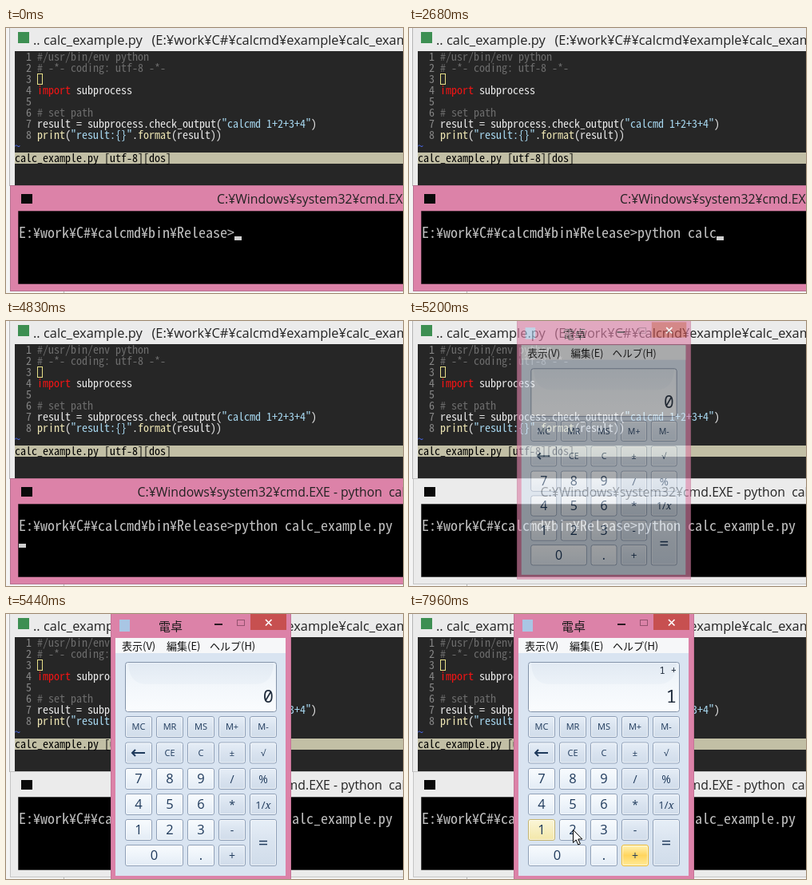
Recreate the animation shown at these times as an HTML page. Size 497 px wide and 332 px high, loop 8000 ms.

```html
<!DOCTYPE html>
<html lang="ja">
<head>
<meta charset="utf-8">
<style>
html, body { margin: 0; width: 100%; height: 100%; overflow: hidden; }
svg { display: block; width: 497px; height: 332px; }
text { white-space: pre; }
.ui { font-family: "Open Sans", "Noto Sans", sans-serif; }
.jp { font-family: "Noto Sans CJK JP", "Noto Sans CJK", sans-serif; }
.mono { font-family: "Noto Sans Mono CJK JP", "Noto Sans CJK JP", "Liberation Mono", monospace; }
.lcd { font-family: "Noto Sans Mono", "DejaVu Sans Mono", monospace; text-anchor: end; fill: #1e2a3a; }
.key text { text-anchor: middle; fill: #1e395b; }
</style>
</head>
<body>
<svg id="stage" viewBox="0 0 497 332">
  <defs id="defs"></defs>
  <g id="desk"></g>
  <g id="calc"></g>
</svg>
<script>
const LOOP = 8000;
const PINK = '#dc82a8', GREY = '#ebebeb', INK = '#c0c0c0';
const CODE = '#e8e8e8', NOTE = '#6c6c6c', STRING = '#a6d6ee', CALL = '#eee6b4';
const $ = id => document.getElementById(id);
const esc = s => s.replace(/&/g, '&amp;').replace(/</g, '&lt;');

const rect = (x, y, w, h, fill, more = '') =>
  `<rect x="${x}" y="${y}" width="${w}" height="${h}" fill="${fill}" ${more}/>`;
const text = (cls, x, y, size, s, fill = '#222', more = '') =>
  `<text class="${cls}" x="${x}" y="${y}" font-size="${size}" fill="${fill}" ${more}>${esc(s)}</text>`;
// One x per character keeps the text on the terminal grid.
const cells = (s, x, y, w, fill, more) =>
  text('mono', [...s].map((_, i) => x + i * w).join(' '), y, w * 2, s, fill, more);
const grad = (id, ...stops) =>
  `<linearGradient id="${id}" x2="0" y2="1">${stops.map((c, i) =>
    `<stop offset="${i / (stops.length - 1)}" stop-color="${c}"/>`).join('')}</linearGradient>`;

$('defs').innerHTML =
  grad('num', '#f8fbfe', '#eef4fa', '#e2ebf5') +
  grad('fn', '#e6eef7', '#d9e3ef', '#d0dcea') +
  grad('lcd', '#eaf1f8', '#f3f7fb', '#fafcfe') +
  grad('dome', '#e2eaf3', '#ecf2f8') +
  grad('tint1', '#fbf8ea', '#f6eed2') +
  grad('tint2', '#fbf6d8', '#f3e7a8') +
  grad('tint3', '#fff3b8', '#ffd55e', '#ffeb9a');

function editor() {
  // Each line is a list of [text, colour] runs.
  const lines = [
    [['#/usr/bin/env python', NOTE]],
    [['# -*- coding: utf-8 -*-', NOTE]],
    [],
    [['import', '#f01414'], [' subprocess', CODE]],
    [],
    [['# set path', NOTE]],
    [['result = subprocess.check_output(', CODE], ['"calcmd 1+2+3+4"', STRING], [')', CODE]],
    [['print', CALL], ['(', CODE], ['"result:{}"', STRING], ['.', CODE], ['format', CALL], ['(result))', CODE]]
  ];
  let out = rect(0, 0, 497, 332, '#f4f4f4') + rect(4, 0, 493, 198, GREY) +
    rect(4, 0, 1, 198, '#b4b4b4') + rect(15, 5, 14, 14, '#3d8f52') +
    text('ui', 34, 21, 16.4, '.. calc_example.py') +
    text('ui', 182.5, 21, 16.4, '(E:¥work¥C#¥calcmd¥example¥calc_example.py)') +
    rect(11, 29, 486, 168, '#262626');
  lines.forEach((runs, i) => {
    const y = 41 + i * 14;
    let x = 39;
    out += cells(`${i + 1}`, 25, y, 7, '#858585');
    for (const [s, color] of runs) {
      out += cells(s, x, y, 7, color);
      x += s.length * 7;
    }
  });
  return out + rect(39.5, 57.5, 6, 13, 'none', 'stroke="#e8e088"') +
    cells('~', 11, 153, 7, '#4a6cf0') +
    rect(11, 156, 486, 14, '#c2bfa5') +
    cells('calc_example.py [utf-8][dos]', 11, 167.5, 7, '#000');
}

const CMD = 'C:¥Windows¥system32¥cmd.EXE';
const TYPED = 'python calc_example.py';

function consoleWindow() {
  return rect(72, 329, 1, 3, '#b8b8b8') +
    rect(5.5, 197.5, 500, 132, PINK, 'id="frame" stroke="#a8647f"') +
    rect(19, 208, 14, 12, '#0a0a0a') +
    `<g id="title">${text('ui', 264, 220, 15.8, CMD)}</g>` +
    rect(15.5, 229.5, 490, 91, '#000', 'stroke="#000" stroke-opacity=".4"') +
    cells('E:¥work¥C#¥calcmd¥bin¥Release>', 16, 263, 9, INK) +
    `<g id="typed">${[...TYPED].map((c, i) => cells(c, 286 + i * 9, 263, 9, INK)).join('')}</g>` +
    rect(0, 0, 9, 5, '#cfcfcf', 'id="caret"');
}

const COLS = [149, 188, 227, 266, 305], ROWS = [128, 160.5, 193, 225, 257, 289];
const KEYS = [
  ['MC', 'MR', 'MS', 'M+', 'M-'], ['←', 'CE', 'C', '±', '√'],
  ['7', '8', '9', '/', '%'], ['4', '5', '6', '*', '1/x'],
  ['1', '2', '3', '-', '='], ['0', '', '.', '+']
];

function key(label, c, r) {
  if (!label) return '';
  const w = label === '0' ? 73 : 34, h = label === '=' ? 59 : 27;
  const x = COLS[c], y = ROWS[r], cx = x + w / 2, cy = y + h / 2;
  const num = /^[0-9.]$/.test(label);
  const big = label === '=' ? 22 : num ? 16.5 : /[-+*/%]/.test(label) && label.length < 2 ? 14 : 11;
  const id = label === '1' ? 'id="one"' : label === '+' ? 'id="plus"' : '';
  let face = text('ui', cx, cy + big * 0.36, big, label);
  if (label === '←') {
    face = `<path d="M${cx - 8} ${cy}h16M${cx - 4} ${cy - 4}l-4 4l4 4" fill="none" stroke="#1e395b" stroke-width="2"/>`;
  } else if (label === '1/x') {
    face = `<text class="ui" x="${cx}" y="${cy + 5}" font-size="13">1/<tspan font-family="Noto Serif, serif" font-style="italic">x</tspan></text>`;
  }
  return `<g class="key">${rect(x + .5, y + .5, w - 1, h - 1, `url(#${num ? 'num' : 'fn'})`,
    `${id} rx="2.5" stroke="#8e9fb7"`)}${rect(x + 1.5, y + 1.5, w - 3, h - 3, 'none',
    'rx="1.5" stroke="#fff" stroke-opacity=".6"')}${face}</g>`;
}

function calculator() {
  return rect(131.5, -2, 225, 335.5, PINK, 'stroke="#c47496"') +
    rect(142, 7, 13, 15, '#a9c6e4') +
    text('jp', 191, 21, 15, '電卓', '#1a1a1a') +
    rect(261, 12, 10, 2, '#2a1a22') +
    rect(289.5, 7.5, 9, 7, 'none', 'stroke="#94536f"') +
    rect(306, 0, 45, 20, '#c75050') +
    '<path d="M325 7l7.5 7.5m0 -7.5l-7.5 7.5" stroke="#fff" stroke-width="1.7"/>' +
    rect(137, 30, 213, 298, '#d9e4f1') + rect(137, 30, 213, 19, '#f6f7f9') +
    text('jp', 145, 45, 13, '表示(V)', '#111') +
    text('jp', 201, 45, 13, '編集(E)', '#111') +
    text('jp', 255, 45, 13, 'ヘルプ(H)', '#111') +
    rect(149.5, 60.5, 189, 62, 'url(#lcd)', 'rx="3" stroke="#8292a8"') +
    '<path d="M153 62h182q-1 25 -22 26h-138q-21 -1 -22 -26z" fill="url(#dome)"/>' +
    text('lcd', 335, 75, 12, '', '', 'id="memo"') +
    text('lcd', 335, 111, 22, '0', '', 'id="value"') +
    KEYS.map((row, r) => row.map((s, c) => key(s, c, r)).join('')).join('') +
    '<path id="mouse" d="M.5 .5v16l3.7 -3.5l2.6 6l2.6 -1.1l-2.6 -5.9h5z" fill="#fff" stroke="#000"/>';
}

$('desk').innerHTML = editor() + consoleWindow();
$('calc').innerHTML = calculator();

// [time, characters typed, caret visible]
const TYPE = [
  [0, 0, 1], [250, 1, 0], [360, 2, 0], [470, 2, 1], [580, 3, 1], [690, 4, 1],
  [800, 5, 1], [910, 5, 0], [1030, 6, 0], [1150, 6, 1], [1520, 6, 0], [1770, 6, 1],
  [2010, 7, 1], [2120, 8, 0], [2230, 9, 0], [2350, 10, 0], [2460, 11, 0],
  [2680, 11, 1], [2800, 12, 1], [2920, 13, 1], [3040, 14, 1], [3160, 14, 0],
  [3290, 15, 0], [3410, 16, 0], [3630, 22, 0], [4000, 22, 1], [4250, 22, 0],
  [4600, 22, 1], [4720, 22, 0], [4830, 22, 1], [5200, 22, 0]
];
// [time, opacity, scale]
const OPEN = [[0, 0, 1], [5200, .63, .965], [5320, .93, .994], [5440, 1, 1]];
// [time, mouse place, tint of 1, tint of +]
const CLICK = [
  [0, '', 0, 0], [6910, '166 270', 1, 0], [7020, '166 270', 3, 0], [7140, '166 270', 2, 0],
  [7510, '282 300', 2, 1], [7630, '282 300', 2, 3], [7960, '205 270', 2, 3]
];
const at = (steps, t) => steps.findLast(s => s[0] <= t);
const set = (id, attrs) => {
  for (const k in attrs) $(id).setAttribute(k, attrs[k]);
};
const letters = [...$('typed').children];
const titleText = $('title').firstChild;

function draw(t) {
  const [, count, caret] = at(TYPE, t);
  letters.forEach((el, i) => el.setAttribute('visibility', i < count ? 'visible' : 'hidden'));
  const entered = t >= 4600;
  set('caret', {
    x: entered ? 16 : 286 + count * 9,
    y: entered ? 279 : 261,
    visibility: caret ? 'visible' : 'hidden'
  });
  const running = t >= 4720;
  titleText.textContent = running ? CMD + ' - python  ' + TYPED.slice(7) : CMD;
  titleText.setAttribute('x', running ? 164.5 : 264);
  const idle = t >= 5200;
  set('frame', { fill: idle ? GREY : PINK, stroke: idle ? '#c4c4c4' : '#b87090' });

  const [, alpha, scale] = at(OPEN, t);
  set('calc', {
    opacity: alpha,
    visibility: alpha ? 'visible' : 'hidden',
    transform: `translate(244 40) scale(${scale}) translate(-244 -40)`
  });
  const [, place, one, plus] = at(CLICK, t);
  const tint = (id, n, base) => set(id, {
    fill: `url(#${n ? 'tint' + n : base})`,
    stroke: ['#8e9fb7', '#c4b78e', '#c4b46e', '#eebb2c'][n]
  });
  tint('one', one, 'num');
  tint('plus', plus, 'fn');
  set('mouse', { transform: `translate(${place || '0 0'})`, display: place ? 'inline' : 'none' });
  $('value').textContent = t >= 7020 ? '1' : '0';
  $('memo').textContent = t >= 7630 ? '1 +' : '';
}

function tick() {
  draw(performance.now() % LOOP);
  requestAnimationFrame(tick);
}
tick();
</script>
</body>
</html>
```
